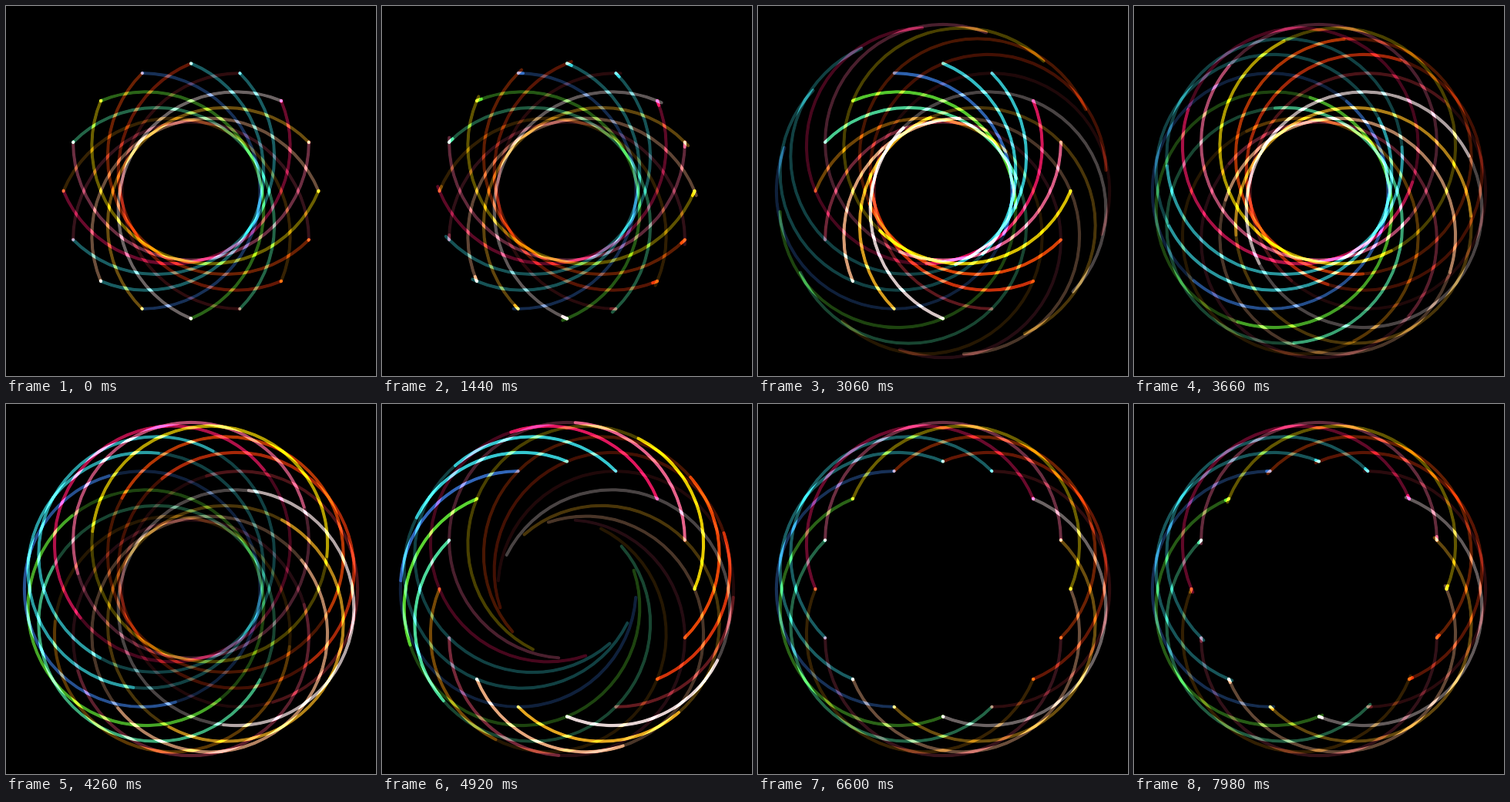
These frames come from a looping animation (480 px wide and 480 px high, 8000 ms). An HTML page without scripts:

```html
<!DOCTYPE html>
<html lang="en">
<head>
<meta charset="utf-8">
<title>Ring of arcs</title>
<style>
  @property --u { syntax: "<number>"; inherits: true; initial-value: 0; }

  html, body { margin: 0; width: 100%; height: 100%; overflow: hidden; background: #000; }

  svg {
    display: block;
    width: 100%;
    height: 100%;
    /* eased sweep in degrees, and closeness to the middle of the motion */
    --z: calc(540 * (var(--u) - .1587 * sin(var(--u) * 360deg) + .0069 * sin(var(--u) * 720deg)));
    --mid: calc(2 * min(var(--u), 1 - var(--u)));
    --dim: max(.41, .54 - .5 * var(--mid));
    animation: sweep 8s infinite;
  }

  @keyframes sweep {
    0% { --u: 0; }
    15% { --u: 0; animation-timing-function: steps(90); }
    82.5% { --u: 1; }
    97.5% { --u: 1; animation-timing-function: steps(3); }
    99.75%, 100% { --u: .96667; }
  }

  use {
    fill: none;
    stroke-width: 4.2px;
    stroke-linecap: round;
    stroke-dasharray: calc(var(--len) * 1px) 999px;
    stroke-dashoffset: calc(var(--tail) * -1px);
    transform: rotate(calc(var(--k) * 22.5deg));
    mix-blend-mode: plus-lighter;
  }

  .trail {
    --tail: max(0, var(--z) - 360);
    --len: (min(360, var(--z) + 180) - var(--tail));
    stroke-opacity: var(--dim);
  }

  .beam {
    --tail: clamp(0, var(--z) - 180, 359.8);
    --len: max(.2, min(360, var(--z)) - var(--tail));
    stroke-opacity: calc(min(1, 1.3 - .6 * var(--mid)) - var(--dim));
  }
</style>
</head>
<body>
<svg viewBox="-240 -240 480 480">
  <defs>
    <path id="ring" pathLength="360" d="M63.3 152.9a152.9 152.9 0 0 1 0-305.8a152.9 152.9 0 0 1 0 305.8"/>
    <filter id="glow" filterUnits="userSpaceOnUse" x="-240" y="-240" width="480" height="480" color-interpolation-filters="sRGB">
      <feComponentTransfer>
        <feFuncR type="gamma" exponent="1.4"/>
        <feFuncG type="gamma" exponent="1.4"/>
        <feFuncB type="gamma" exponent="1.4"/>
      </feComponentTransfer>
    </filter>
  </defs>
  <g filter="url(#glow)">
    <rect x="-240" y="-240" width="480" height="480"/>
    <g style="--k:0" stroke="rgb(140 55 62)"><use href="#ring" class="trail"/><use href="#ring" class="beam"/></g>
    <g style="--k:1" stroke="rgb(255 241 241)"><use href="#ring" class="trail"/><use href="#ring" class="beam"/></g>
    <g style="--k:2" stroke="rgb(255 203 62)"><use href="#ring" class="trail"/><use href="#ring" class="beam"/></g>
    <g style="--k:3" stroke="rgb(255 203 166)"><use href="#ring" class="trail"/><use href="#ring" class="beam"/></g>
    <g style="--k:4" stroke="rgb(158 74 96)"><use href="#ring" class="trail"/><use href="#ring" class="beam"/></g>
    <g style="--k:5" stroke="rgb(158 113 21)"><use href="#ring" class="trail"/><use href="#ring" class="beam"/></g>
    <g style="--k:6" stroke="rgb(116 244 191)"><use href="#ring" class="trail"/><use href="#ring" class="beam"/></g>
    <g style="--k:7" stroke="rgb(131 241 85)"><use href="#ring" class="trail"/><use href="#ring" class="beam"/></g>
    <g style="--k:8" stroke="rgb(85 144 218)"><use href="#ring" class="trail"/><use href="#ring" class="beam"/></g>
    <g style="--k:9" stroke="rgb(91 230 237)"><use href="#ring" class="trail"/><use href="#ring" class="beam"/></g>
    <g style="--k:10" stroke="rgb(91 230 237)"><use href="#ring" class="trail"/><use href="#ring" class="beam"/></g>
    <g style="--k:11" stroke="rgb(251 49 135)"><use href="#ring" class="trail"/><use href="#ring" class="beam"/></g>
    <g style="--k:12" stroke="rgb(255 140 179)"><use href="#ring" class="trail"/><use href="#ring" class="beam"/></g>
    <g style="--k:13" stroke="rgb(255 233 0)"><use href="#ring" class="trail"/><use href="#ring" class="beam"/></g>
    <g style="--k:14" stroke="rgb(255 111 21)"><use href="#ring" class="trail"/><use href="#ring" class="beam"/></g>
    <g style="--k:15" stroke="rgb(240 88 30)"><use href="#ring" class="trail"/><use href="#ring" class="beam"/></g>
  </g>
</svg>
</body>
</html>
```
